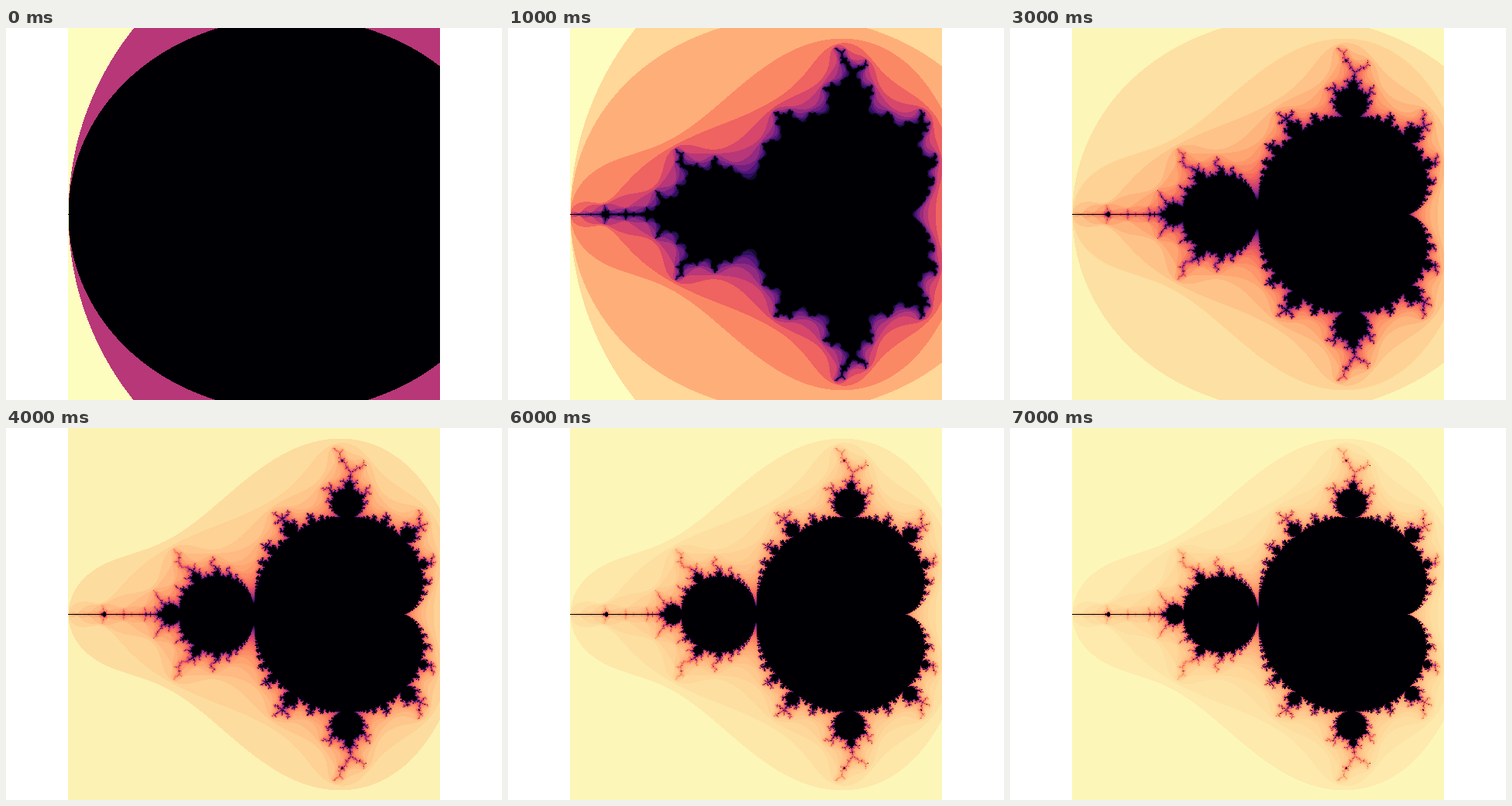
An HTML page with a canvas that plays this animation: 640x480 px, repeating every 8000 ms.

```html
<!DOCTYPE html>
<html lang="en">
<head>
<meta charset="utf-8">
<title>Mandelbrot set by iteration limit</title>
<style>
  html, body { margin: 0; width: 100%; height: 100%; overflow: hidden; background: #fff; }
  canvas { display: block; }
</style>
</head>
<body>
<canvas id="stage" width="640" height="480"></canvas>
<script>
const SIZE = 480, LEFT = 80, SCALE = 192;
const STEPS = 8, STEP_MS = 1000;
const limitAt = step => 2 + 10 * step;
const MAX_LIMIT = limitAt(STEPS - 1);

const MAGMA = '000004 140e36 3b0f70 641a80 8c2981 b73779 de4968 f7705c fe9f6d fecf92 fcfdbf'
  .split(' ')
  .map(hex => [0, 2, 4].map(i => parseInt(hex.slice(i, i + 2), 16)));

function magma(t) {
  const p = t * (MAGMA.length - 1);
  const i = Math.min(Math.floor(p), MAGMA.length - 2);
  return MAGMA[i].map((v, ch) => Math.round(v + (MAGMA[i + 1][ch] - v) * (p - i)));
}

// Iterations before |z| exceeds 2
function escapeCount(cx, cy) {
  let x = 0, y = 0;
  for (let n = 0; n < MAX_LIMIT; n++) {
    [x, y] = [x * x - y * y + cx, 2 * x * y + cy];
    if (x * x + y * y > 4) return n;
  }
  return MAX_LIMIT;
}

const counts = new Uint8Array(SIZE * SIZE);
for (let i = 0; i < counts.length; i++) {
  counts[i] = escapeCount(-2 + (i % SIZE) / SCALE, (Math.floor(i / SIZE) - SIZE / 2) / SCALE);
}

const ctx = document.getElementById('stage').getContext('2d');
const image = ctx.createImageData(SIZE, SIZE);

function draw(step) {
  const limit = limitAt(step);
  // The palest bands share one tone at higher limits
  const merged = limit < 32 ? 1 : limit < 42 ? 2 : 3;
  const palette = Array.from({ length: limit + 1 }, (_, n) =>
    magma(1 - (n < merged ? (merged - 1) / 2 : n) / limit));
  counts.forEach((n, i) => image.data.set([...palette[Math.min(n, limit)], 255], i * 4));
  ctx.putImageData(image, LEFT, 0);
}

let shown = -1;
function tick() {
  const step = Math.floor(performance.now() / STEP_MS) % STEPS;
  if (step !== shown) draw(shown = step);
  requestAnimationFrame(tick);
}
tick();
</script>
</body>
</html>
```
